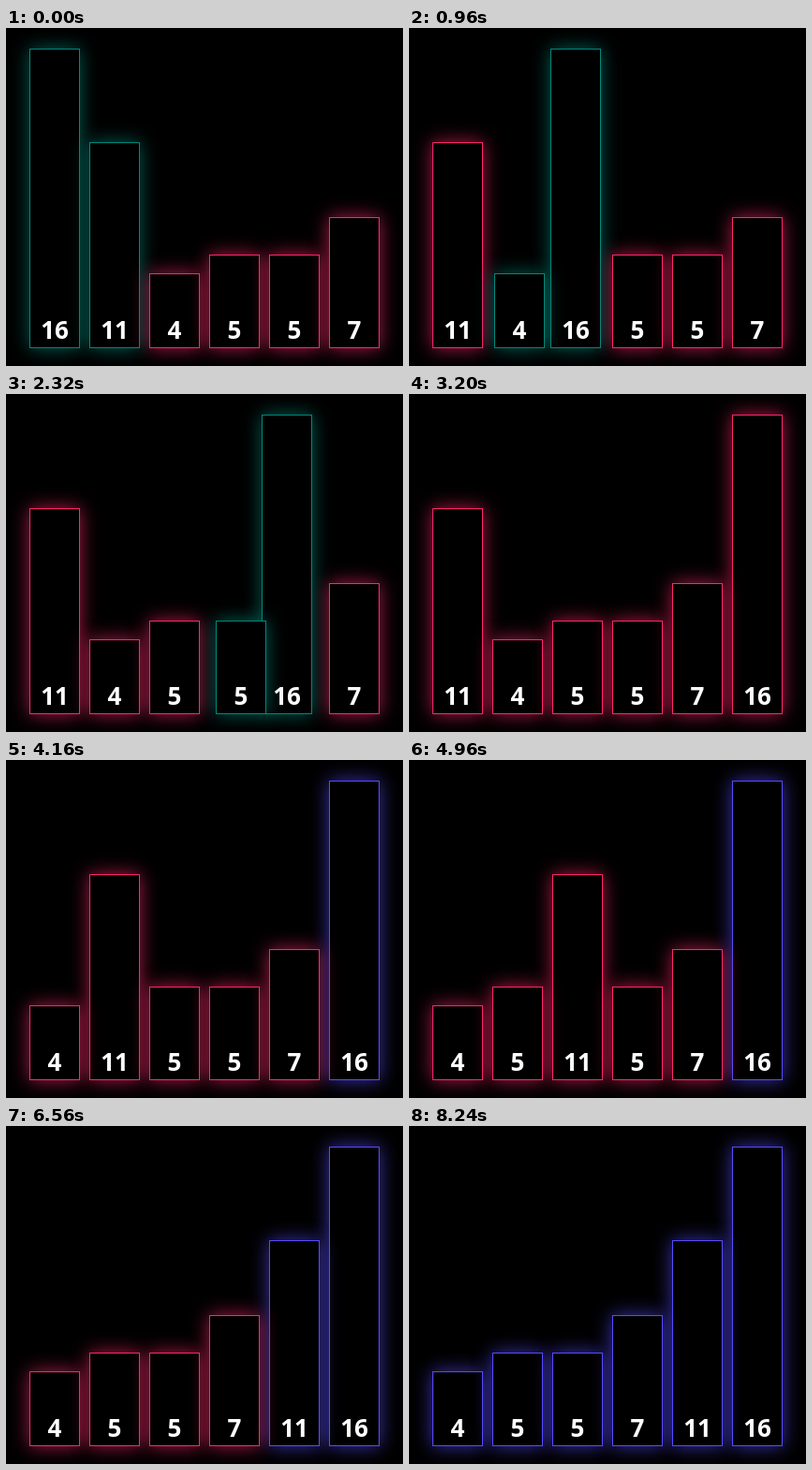
Recreate the animation shown at these times as an HTML page with a canvas. Size 424 px wide and 361 px high, loop 9.44 s.

```html
<!DOCTYPE html>
<html lang="en">
<head>
<meta charset="utf-8">
<title>Bubble sort</title>
<style>
  html, body { margin: 0; width: 100%; height: 100%; overflow: hidden; background: #000; }
  canvas { display: block; }
</style>
</head>
<body>
<canvas id="stage" width="424" height="361"></canvas>
<script>
const ctx = document.getElementById('stage').getContext('2d');

// Layout
const LEFT = 25, PITCH = 64, WIDTH = 54, FLOOR = 342, UNIT = 20;
const IDLE = '255,40,108', ACTIVE = '0,137,123', DONE = '88,76,255';
const values = [16, 11, 4, 5, 5, 7];

// Timing in ms; the sort is already under way when the loop begins
const LOOP = 9440, TICK = 80, LEAD = -79;
const GLIDE = 140, SWAP_DELAY = 251.5, LIT_SWAP = 482, LIT_KEEP = 180;
const SETTLE = 203, PAUSE = 280;
const gapAfter = pass => pass ? 252 : 210;

// Runs the sort once and notes when each pair lights up, swaps and settles
function planSort(list) {
  const work = list.slice(), steps = [], settled = [];
  let clock = LEAD, pass = 0, swapped;
  do {
    swapped = false;
    const last = work.length - 1 - pass;
    let off = clock;
    for (let i = Math.max(0, pass - 1); i < last; i++) {
      const swaps = work[i] > work[i + 1];
      off = clock + (swaps ? LIT_SWAP : LIT_KEEP);
      steps.push({ i, on: clock, off, swap: swaps ? clock + SWAP_DELAY : Infinity });
      if (swaps) {
        [work[i], work[i + 1]] = [work[i + 1], work[i]];
        swapped = true;
      }
      clock = off + gapAfter(pass);
    }
    settled[last] = off + SETTLE;
    pass++;
    clock = settled[last] + PAUSE * (swapped ? pass : 1);
  } while (swapped);
  for (let i = 0; i < work.length - pass; i++) settled[i] = clock;
  return { steps, settled };
}

const { steps, settled } = planSort(values);
const easeOut = x => 1 - (1 - x) ** 3;

function barsAt(t) {
  const bars = values.map((value, i) => ({ value, x: i, color: IDLE }));
  const order = bars.slice();

  for (const { i, on, off, swap } of steps) {
    if (t < on) break;
    const a = order[i], b = order[i + 1];
    if (t < off) a.color = b.color = ACTIVE;
    if (t >= swap) {
      const p = easeOut(Math.min(1, (t - swap) / GLIDE));
      a.x = i + p;
      b.x = i + 1 - p;
      order[i] = b;
      order[i + 1] = a;
    }
  }

  order.forEach((bar, i) => { if (t >= settled[i]) bar.color = DONE; });
  return bars;
}

function drawBar({ value, x, color }) {
  const left = Math.floor(LEFT + x * PITCH + 0.1);
  const height = value * UNIT, top = FLOOR - height;

  ctx.fillStyle = '#000';
  ctx.shadowBlur = 20;
  ctx.shadowColor = `rgba(${color},0.68)`;
  ctx.fillRect(left, top, WIDTH, height);
  ctx.shadowColor = 'transparent';

  ctx.strokeStyle = `rgb(${color})`;
  ctx.strokeRect(left + 0.5, top + 0.5, WIDTH - 1, height - 1);
  ctx.fillStyle = '#fff';
  ctx.fillText(value, left + WIDTH / 2, FLOOR - 10);
}

function draw(t) {
  ctx.fillStyle = '#000';
  ctx.fillRect(0, 0, 424, 361);
  ctx.font = '700 26px "Open Sans", "Noto Sans", sans-serif';
  ctx.textAlign = 'center';
  ctx.lineWidth = 1;
  barsAt(t).forEach(drawBar);
}

const start = performance.now();
function frame() {
  const t = (performance.now() - start) % LOOP;
  draw(Math.floor(t / TICK) * TICK);
  requestAnimationFrame(frame);
}
frame();
</script>
</body>
</html>
```
